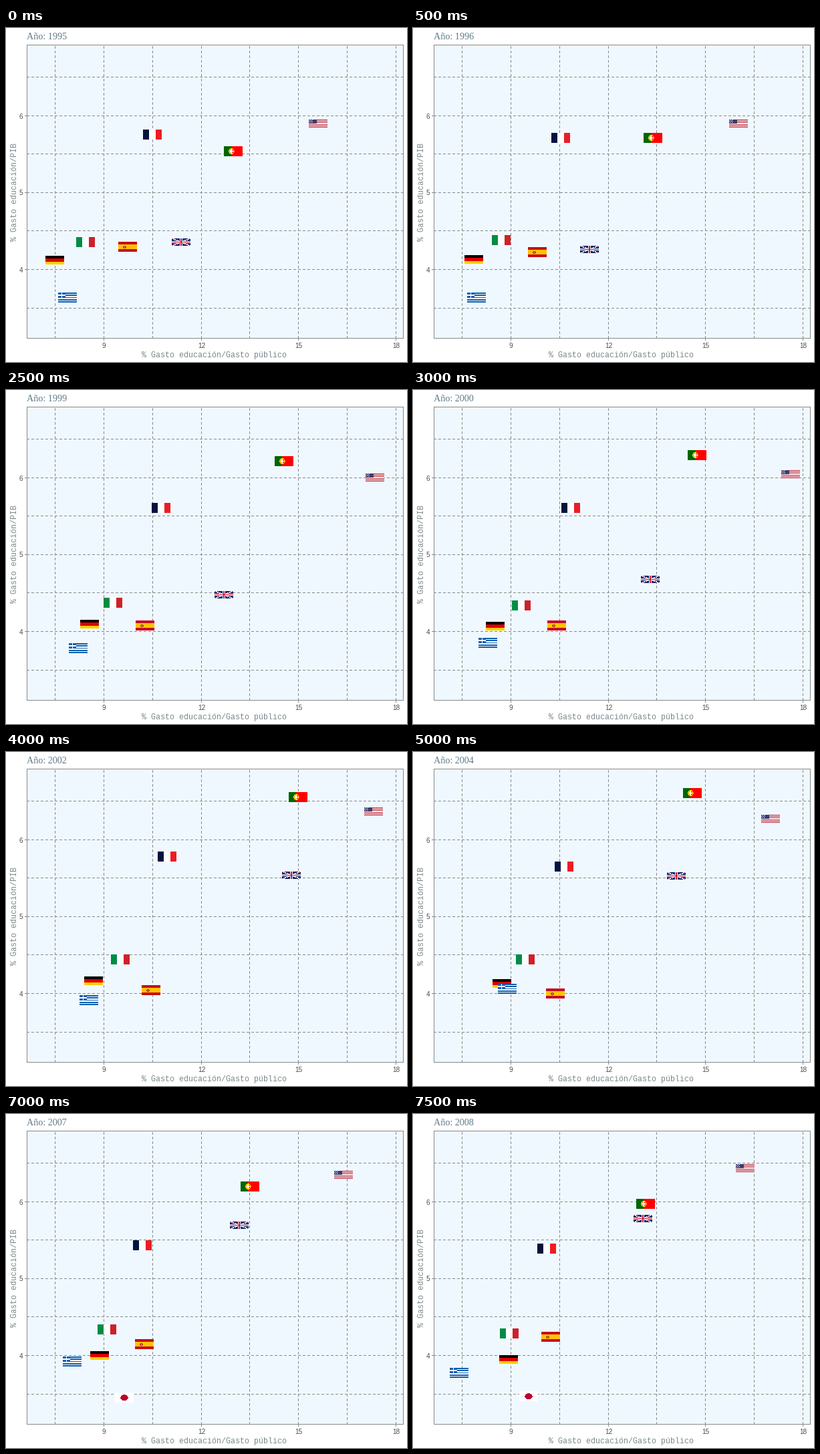
These frames come from a looping animation (600 px wide and 500 px high, 8 s). A matplotlib script:

```python
import numpy as np
import matplotlib.pyplot as plt
from matplotlib.animation import FuncAnimation
from matplotlib.patches import Rectangle
from matplotlib.colors import to_rgb

W, H, DPI = 600, 500, 100
FRAMES, INTERVAL = 16, 500
PX = 72 / DPI
LINE, TITLE, INK, TICK = "#838B8B", "#607B8B", "#7C888C", "#4D4D4D"
LEFT, TOP, RIGHT, BOTTOM = 31, 25, 594, 464
FLAG_W = 28


class Canvas:
    """Small flag picture, painted through masks."""

    def __init__(self, height, base="white"):
        self.h = height
        self.rgb = np.full((height, FLAG_W, 3), to_rgb(base))
        self.y, self.x = np.mgrid[0:height, 0:FLAG_W] + 0.5

    def paint(self, mask, color):
        self.rgb[mask] = to_rgb(color)
        return self

    def disc(self, cx, cy, r, color, squash=1):
        return self.paint(np.hypot(self.x - cx, (self.y - cy) / squash) < r, color)

    def stripes(self, n, color):
        return self.paint(self.y * n // self.h % 2 == 0, color)


def vertical(left, right):
    c = Canvas(15)
    return c.paint(c.x < FLAG_W / 3, left).paint(c.x > FLAG_W * 2 / 3, right)


def germany():
    c = Canvas(13, "black")
    return c.paint(c.y > c.h / 3, "#DD0000").paint(c.y > c.h * 2 / 3, "#FFCE00")


def spain():
    c = Canvas(15, "#C60B1E")
    c.paint(abs(c.y - c.h / 2) < c.h / 4, "#FFC400")
    return c.disc(9.5, 8, 2.4, "#AD3A20").disc(9.5, 8, 1, "#E8B0A0")


def portugal():
    c = Canvas(15, "#FF0000")
    c.paint(c.x < 0.4 * FLAG_W, "#006600")
    return c.disc(11.4, 7.5, 4.2, "#FFE900").disc(11.4, 7.5, 3, "#FF0000").disc(11.4, 7.5, 2.2, "white")


def greece():
    c = Canvas(15).stripes(9, "#0D5EAF")
    canton = (c.x < 11) & (c.y < c.h * 5 / 9)
    c.paint(canton, "#0D5EAF")
    return c.paint(canton & ((abs(c.x - 5.5) < 1) | (abs(c.y - 4.2) < 0.9)), "white")


def japan():
    return Canvas(15).disc(14, 7.7, 5.6, "#BC002D", squash=0.8)


def kingdom():
    c = Canvas(11, "#012169")
    dx, dy = abs(c.x - FLAG_W / 2), abs(c.y - c.h / 2)
    diagonal = abs(dy - dx * c.h / FLAG_W)
    c.paint(diagonal < 0.9, "white").paint(diagonal < 0.2, "#C8102E")
    c.paint((dx < 2.5) | (dy < 1.8), "white")
    return c.paint((dx < 1.5) | (dy < 1), "#C8102E")


def states():
    c = Canvas(12).stripes(13, "#B22234")
    c.paint((c.x < 12) & (c.y < c.h / 2), "#3C3B6E")
    return c.paint((c.x < 6) & (c.y < 5) & ((c.x + c.y) % 3 == 0), "#D8D8E4")


KEYS = [0, 3, 6, 8, 12, 15]


class Flag:
    """Glides between its stops, one per key step; fewer stops mean a later start."""

    def __init__(self, ax, canvas, *stops):
        self.h = canvas.h
        self.keys = KEYS[-len(stops):]
        self.xs, self.ys = zip(*stops)
        self.art = ax.imshow(canvas.rgb, interpolation="nearest", aspect="auto", zorder=3)

    def show(self, i):
        x, y = (round(np.interp(i, self.keys, v)) for v in (self.xs, self.ys))
        self.art.set_extent((x, x + FLAG_W, y + self.h, y))
        self.art.set_visible(i >= self.keys[0])


fig = plt.figure(figsize=(W / DPI, H / DPI), dpi=DPI, facecolor="white")
ax = fig.add_axes([0, 0, 1, 1])
ax.axis("off")


def label(x, y, text, font, size, color, **kw):
    return ax.text(x, y, text, family=font, size=size * PX, color=color,
                   va="baseline", **kw)


def line(xs, ys, ls="-", z=2):
    # Whole coordinates snap to the centre of their pixel
    ax.plot(xs, ys, color=LINE, lw=PX, ls=ls, zorder=z, antialiased=False,
            solid_capstyle="butt", dash_capstyle="butt")


DASH = (0, (4, 4))
ax.add_patch(Rectangle((LEFT, TOP), RIGHT - LEFT, BOTTOM - TOP, fc="#F0F8FF", ec="none", zorder=0))
for i in range(8):
    x = round(73.3 + 72.8 * i)
    line([x, x], [BOTTOM, TOP], DASH, 1)
    if i % 2:
        line([x, x], [BOTTOM, BOTTOM + 3])
        label(x + 0.5, 479, f"{7.5 + 1.5 * i:.0f}", "Liberation Sans", 10, TICK, ha="center")
for i in range(7):
    y = int(73.5 + 57.6 * i)
    line([LEFT, RIGHT], [y, y], DASH, 1)
    if i % 2:
        line([LEFT - 3, LEFT], [y, y])
        label(25, y + 4.5, f"{6.5 - i / 2:.0f}", "Liberation Sans", 10, TICK, ha="right")
line([LEFT, RIGHT, RIGHT, LEFT, LEFT], [TOP, TOP, BOTTOM, BOTTOM, TOP], z=4)

label(203, 493, "% Gasto educación/Gasto público", "Liberation Mono", 11.67, INK)
label(16, 319, "% Gasto educación/PIB", "Liberation Mono", 11.67, INK,
      rotation=90, rotation_mode="anchor")
title = label(31, 17, "", "Liberation Serif", 14.1, TITLE)

# From back to front
flags = [
    Flag(ax, germany(), (59, 341), (114, 338), (109, 347), (117, 336), (121, 343), (129, 361)),
    Flag(ax, spain(), (168, 320), (180, 344), (201, 345), (203, 349), (195, 358), (192, 326)),
    Flag(ax, states(), (453, 137), (512, 136), (551, 120), (536, 83), (506, 105), (483, 75)),
    Flag(ax, vertical("#001440", "#ED1C24"),
         (205, 152), (210, 168), (222, 169), (227, 149), (198, 179), (186, 194)),
    Flag(ax, greece(), (78, 396), (86, 396), (98, 371), (110, 364), (144, 330), (55, 380)),
    Flag(ax, vertical("#008C45", "#CD212A"),
         (105, 313), (143, 303), (148, 315), (157, 303), (152, 303), (130, 321)),
    Flag(ax, japan(), (171, 420), (159, 415)),
    Flag(ax, portugal(), (326, 177), (383, 118), (411, 90), (423, 60), (385, 49), (334, 127)),
    Flag(ax, kingdom(), (248, 315), (255, 348), (341, 278), (413, 179), (346, 182), (330, 151)),
]


def update(i):
    title.set_text(f"Año: {round(1995 + 0.86 * i)}")
    for flag in flags:
        flag.show(i)
    ax.set(xlim=(0, W), ylim=(H, 0))


anim = FuncAnimation(fig, update, frames=FRAMES, interval=INTERVAL,
                     repeat=True, repeat_delay=0, blit=False)
plt.show()
```
